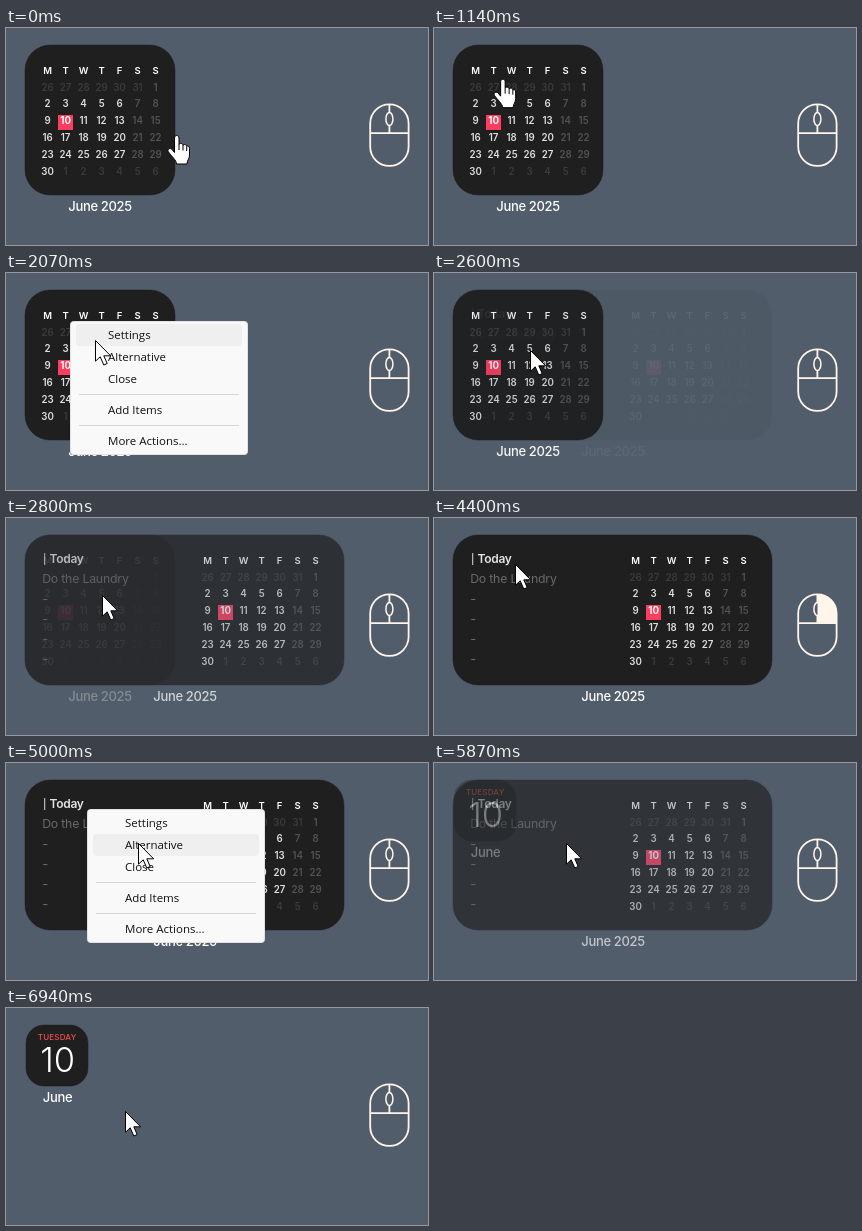
Animation of 422x217 px, one loop 7000 ms. Source, as an HTML page:

```html
<!DOCTYPE html>
<html lang="en">
<head>
<meta charset="utf-8">
<title>Calendar widget</title>
<style>
  html, body { margin: 0; width: 100%; height: 100%; overflow: hidden; background: #525d6b; }
  svg { display: block; width: 422px; height: 217px; font-family: Inter, sans-serif; cursor: default; }
  #menu { font-family: "Open Sans", "Noto Sans", sans-serif; }
</style>
</head>
<body>
<svg viewBox="0 0 422 217">
  <g id="mouse" fill="none" stroke="#fff5ea" stroke-width="1.8">
    <path id="button" d="M383.5 76.5A19 19 0 0 1 402.5 95.5V105H383.5Z" fill="#fff5ea" stroke="none"/>
    <rect x="364.2" y="76.3" width="38.4" height="61.6" rx="19.2"/>
    <path d="M364.2 105.2H402.6M383.4 76.3V84.5M383.4 97.5V105"/>
    <ellipse cx="383.4" cy="91" rx="3.5" ry="6.6" stroke-width="1.5"/>
  </g>
  <g id="medium"></g>
  <g id="wide"></g>
  <g id="small"></g>
  <g id="menu"></g>
  <path id="arrow" d="M.5 .5V21.2L5.2 16.8L8.8 25L12.2 23.5L8.8 15.8H15.6Z" fill="#fff" stroke="#000"/>
  <g id="hand" stroke="#000" stroke-linejoin="round">
    <path fill="#fff" d="M7.5 3C7.5 -.3 12 -.3 12 3V9.5C12.5 8 16 8 16 10.5C16.5 9 19.5 9 19.7 11.5C20.5 10.5 22.5 11 22.5 13.5V20C22.5 24 20 25 20 29H9.5C9.5 25 4 21 1.2 16.5C0 14 3.5 12.5 5 14.5L7.5 17.5Z"/>
    <path fill="none" d="M12 9.5V15M16 10.5V15.5M19.7 11.5V16"/>
  </g>
</svg>
<script>
const LOOP = 7000, FPS = 15;
const $ = id => document.getElementById(id);

// Text placed by the vertical centre of its capitals
const text = (x, cy, str, size, fill, weight = 400, anchor = 'middle', gap = 0) =>
  `<text x="${x}" y="${cy + size * .364}" font-size="${size}" fill="${fill}" font-weight="${weight}" text-anchor="${anchor}" letter-spacing="${gap}">${str}</text>`;
const box = (x, y, w, h, r, fill, extra = '') =>
  `<rect x="${x}" y="${y}" width="${w}" height="${h}" rx="${r}" fill="${fill}" ${extra}/>`;
const panel = (x, w, h, r) => box(x, 17, w, h, r, '#1f1f1f', 'stroke="#1f1f1f" stroke-opacity=".5"');
const label = (x, y, str) => text(x, y, str, 13, '#fff', 450, 'middle', -.35);

function calendar(x) {
  let out = [...'MTWTFSS'].map((d, i) => text(x + i * 18, 43, d, 9.5, '#fff', 600)).join('');
  for (let i = 0; i < 42; i++) {
    const n = i - 5, col = i % 7, cx = x + col * 18, cy = 59 + 16.9 * Math.floor(i / 7);
    const outside = n < 1 || n > 30, today = n === 10;
    const day = n < 1 ? n + 31 : n > 30 ? n - 30 : n;
    if (today) out += box(cx - 7.6, 87, 15, 15, 0, '#ff3d5f');
    out += text(cx, cy, day, 9.7, outside ? '#3b3b3b' : today ? '#fff' : col > 4 ? '#535353' : '#dedede', today ? 700 : 580);
  }
  return out;
}

$('medium').innerHTML = panel(19, 150, 150, 25) + calendar(41.6) + label(94, 177.8, 'June 2025');
$('wide').innerHTML = panel(19, 319, 150, 25) + calendar(201.6) + label(179, 177.8, 'June 2025') +
  text(37, 41, '|', 10, '#e4e4e4', 500, 'start') +
  text(43.5, 41, 'Today', 12, '#e4e4e4', 580, 'start', -.3) +
  text(36.2, 61, 'Do the Laundry', 12.3, '#696969', 400, 'start', -.2) +
  [81, 101, 121, 141].map(y => text(36.2, y, '-', 13, '#696969', 400, 'start')).join('');
$('small').innerHTML = panel(20, 62, 61, 18) +
  text(51.1, 29, 'TUESDAY', 8, '#f4504f', 450, 'middle', .2) +
  text(51.6, 51, '10', 34.5, '#fff', 300) + label(51.5, 88.8, 'June');

const items = [['Settings', 14], ['Alternative', 36], ['Close', 58], ['Add Items', 89], ['More Actions...', 120]];
$('menu').innerHTML = box(.5, .5, 177, 133, 3, '#f9f9f9', 'stroke="#e2e2e2"') +
  box(6, 3, 166, 22, 4, '#efefef', 'id="hover"') +
  '<path d="M9 73.5H169M9 104.5H169" stroke="#d6d6d6"/>' +
  items.map(([s, y]) => text(38, y, s, 11.5, '#111', 400, 'start')).join('');

// Pointer tip: time, x, y
const path = [
  [0, 168, 107], [467, 76, 66], [600, 76, 66], [667, 76, 65], [867, 76, 65], [1200, 65, 49],
  [1267, 65, 49], [1333, 64, 48], [1733, 64, 48], [2067, 89, 67], [2267, 96, 77],
  [3733, 96, 77], [4200, 81, 46], [4533, 81, 46], [5000, 132, 80], [6800, 132, 80],
  [6933, 119, 103], [LOOP, 119, 103]
];
const ramp = (t, a, b) => Math.min(1, Math.max(0, (t - a) / (b - a)));
const ease = p => p * p * (3 - 2 * p);
const between = (t, a, b) => t >= a && t < b;
const show = (id, on) => $(id).setAttribute('opacity', +on);
const move = (id, x, y) => $(id).setAttribute('transform', `translate(${x} ${y})`);

function pointer(t) {
  const i = path.findIndex(k => k[0] > t), [a, x, y] = path[i - 1], [b, u, v] = path[i];
  const p = ease(ramp(t, a, b));
  return [x + (u - x) * p, y + (v - y) * p];
}

function draw(ms) {
  const t = Math.floor((ms % LOOP) * FPS / 1000 + .1) * 1000 / FPS % LOOP;
  const [x, y] = pointer(t);
  const toWide = ease(ramp(t, 2540, 2940)), toSmall = ease(ramp(t, 5733, 6066));
  show('medium', 1 - toWide);
  show('wide', toWide * (1 - toSmall));
  show('small', toSmall);
  show('button', between(t, 1330, 1790) || between(t, 4330, 4790));

  const second = t > 4000, [mx, my] = second ? [81, 46] : [64, 48];
  show('menu', second ? (t < 5730 && ramp(t, 4400, 4533)) : (t < 2460 && ramp(t, 1400, 1533)));
  move('menu', mx, my);
  const row = Math.floor((y - my - 3) / 22);
  show('hover', row >= 0 && row < 3);
  $('hover').setAttribute('y', 3 + row * 22);

  const hand = t < 1330;
  show('hand', hand);
  show('arrow', !hand);
  move('hand', x - 7, y);
  move('arrow', x, y);
}

const start = performance.now();
(function tick() {
  draw(performance.now() - start);
  requestAnimationFrame(tick);
})();
</script>
</body>
</html>
```
